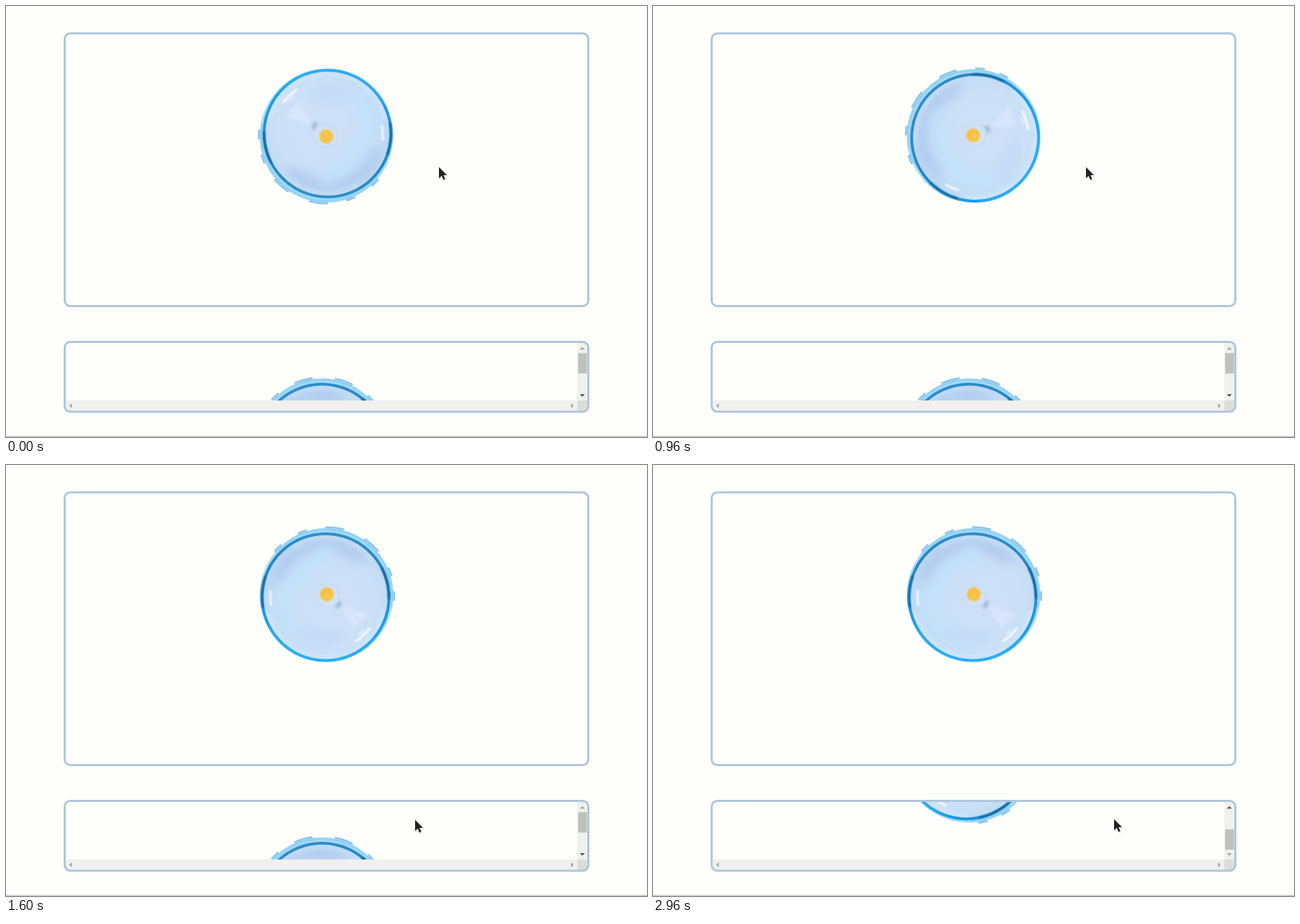
Animation of 912x614 px, one loop 3040 ms. Source, as an HTML page:

```html
<!DOCTYPE html>
<html lang="en">
<head>
<meta charset="utf-8">
<title>Scroll wheel</title>
<style>
  html, body { margin: 0; width: 100%; height: 100%; overflow: hidden; background: #fefffb; }
  svg { display: block; width: 912px; height: 614px; }
</style>
</head>
<body>
<svg viewBox="0 0 912 614" xmlns="http://www.w3.org/2000/svg">
  <defs>
    <filter id="soft" x="-50%" y="-50%" width="200%" height="200%"><feGaussianBlur stdDeviation="8"/></filter>
    <filter id="mild" x="-50%" y="-50%" width="200%" height="200%"><feGaussianBlur stdDeviation="2"/></filter>
    <filter id="fine" x="-50%" y="-50%" width="200%" height="200%"><feGaussianBlur stdDeviation=".8"/></filter>
    <linearGradient id="rim" gradientUnits="userSpaceOnUse" x1="-83" y1="-39" x2="83" y2="39">
      <stop offset="0" stop-color="#23a8f2"/>
      <stop offset=".35" stop-color="#1c98e2"/>
      <stop offset=".7" stop-color="#2485c2"/>
      <stop offset="1" stop-color="#2f8fca"/>
    </linearGradient>
    <radialGradient id="bowl" gradientUnits="userSpaceOnUse" cx="-12" cy="0" r="96">
      <stop offset="0" stop-color="#cfe0f8"/>
      <stop offset=".7" stop-color="#cbdff7"/>
      <stop offset="1" stop-color="#bcd9f4"/>
    </radialGradient>
    <clipPath id="disc"><circle cx="-2.5" cy="-2.5" r="90"/></clipPath>
    <clipPath id="view"><rect x="84" y="480" width="729" height="82"/></clipPath>
    <clipPath id="inner"><rect x="84" y="479" width="744" height="98" rx="7"/></clipPath>
    <g id="wheel"></g>
  </defs>

  <rect width="912" height="614" fill="#fefffb"/>
  <rect y="612.6" width="912" height="1.4" fill="#c6c8c5"/>
  <use id="top" href="#wheel"/>
  <g clip-path="url(#view)"><use id="low" href="#wheel"/></g>

  <g clip-path="url(#inner)">
    <path d="M813 479h15v83h-15zM84 562h729v15H84z" fill="#f0f1ee"/>
    <path d="M813 562h15v15h-15z" fill="#dcdddb"/>
    <rect id="thumb" x="814" y="494.5" width="12.5" height="29" fill="#c0c0be"/>
    <path id="up" d="M816.5 489.5h7l-3.500-3.500z"/>
    <path id="down" d="M816.500 553h7l-3.500 3.500z"/>
    <path d="M93.500 566v7l-3.500-3.500zM804 566v7l3.500-3.500z" fill="#a0a19f"/>
  </g>
  <g fill="none" stroke="#b0c6dc" stroke-width="3">
    <rect x="83.500" y="39" width="745" height="388.500" rx="8"/>
    <rect x="83.500" y="478.500" width="745" height="99.500" rx="8"/>
  </g>

  <g id="cursor">
    <path d="M1 1.500v16l3.800-3.300 2.600 5.800 2.800-1.200-2.500-5.600h5z" fill="#777" opacity=".4" filter="url(#fine)"/>
    <path d="M0 0v16l3.800-3.400 2.500 5.600 2.600-1.100-2.500-5.500h5z" fill="#222" stroke="#fff" stroke-width="1.600" paint-order="stroke" stroke-linejoin="round"/>
  </g>
</svg>
<script>
const $ = id => document.getElementById(id);
const polar = (deg, r, cx = 0, cy = 0) => {
  const a = deg * Math.PI / 180;
  return (cx + r * Math.cos(a)).toFixed(2) + ' ' + (cy + r * Math.sin(a)).toFixed(2);
};

// An open arc between two angles, clockwise.
function arc(from, to, r, color, width, extra = '', c = 0) {
  const big = to - from > 180 ? 1 : 0;
  return `<path d="M${polar(from, r, c, c)}A${r} ${r} 0 ${big} 1 ${polar(to, r, c, c)}"
    fill="none" stroke="${color}" stroke-width="${width}" ${extra}/>`;
}
const tab = (mid, half) =>
  arc(mid - half, mid + half, 95, '#9ad3f4', 4.5) +
  arc(mid - half, mid + half, 97, '#79b3da', 1);

const soft = 'filter="url(#soft)" stroke-linecap="round"';
const mild = 'filter="url(#mild)" stroke-linecap="round"';
const fine = 'filter="url(#fine)" stroke-linecap="round"';

// Angle 0 points at the first tab; the rim sits slightly off the axis.
$('wheel').innerHTML = `
  <circle r="95" fill="#a5dbf8"/>
  ${tab(0, 4)}${tab(28, 8)}${tab(63, 8)}${tab(91, 4)}${tab(335, 4)}${tab(112, 4)}
  ${arc(-30, 122, 93, '#86c8f0', 1.5, fine)}
  <circle cx="-2.500" cy="-2.500" r="90" fill="url(#bowl)"/>
  <g clip-path="url(#disc)">
    ${arc(-48, 62, 72, '#b2cbee', 20, soft)}
    <path d="M${polar(21, 58)}Q${polar(-14, 54)} ${polar(-52, 52)}T${polar(-116, 70)}"
      fill="none" stroke="#bfe2fa" stroke-width="24" opacity=".85" ${soft}/>
    ${arc(190, 228, 62, '#c3dbf7', 22, soft)}
    <path d="M${polar(150, 26)}L${polar(135, 66)} ${polar(162, 62)}Z" fill="#dce8fb" ${mild} opacity=".8"/>
    ${arc(-10, 110, 85, '#c4dcf3', 5, mild, -2.5)}
    ${arc(125, 275, 85, '#cfe7fb', 5, mild, -2.5)}
  </g>
  ${arc(149, 168, 78, '#fff', 2.8, fine)}
  ${arc(155, 162, 73, '#eaf4fe', 2, fine)}
  ${arc(281, 295, 80, '#f4faff', 2.8, fine)}
  <circle cx="-2.500" cy="-2.500" r="90.300" fill="none" stroke="url(#rim)" stroke-width="4"/>
  ${arc(84, 112, 90.3, '#15699f', 3, fine, -2.5)}
  ${arc(282, 310, 90.3, '#15699f', 3, fine, -2.5)}
  ${arc(150, 262, 91, '#3db9fa', 1.2, fine, -2.5)}
  <ellipse cx="-17" cy="10" rx="6.500" ry="5.500" fill="#a4b8d8" ${mild}/>
  <circle cx="-1" cy="1" r="18.500" fill="#c9def5" ${fine}/>
  <circle cx="-1" cy="1" r="14" fill="#d1e3f7" ${fine}/>
  <circle cx=".7" cy=".7" r="10" fill="#f3c244" ${fine}/>
  <circle cx="-2" cy="-1" r="5" fill="#f7c94f" ${mild}/>`;

const LOOP = 3040, STEP = 80, MAX_SCROLL = 211;

// Rows: time, then values.
const spinTop = [[0, 69], [280, 245], [560, 390], [880, 525], [1200, 603], [1360, 608], [1520, 609]];
const spinLow = [[1680, -134], [1760, -112], [2000, 57], [2200, 190], [2400, 292], [2640, 321], [2960, 326]];
const scroll = [[1680, 0], [1760, 25], [1840, 95], [1920, 175], [2000, MAX_SCROLL]];
const pointer = [[1040, 616, 229.5], [1200, 616, 233.5], [1280, 613, 265], [1440, 594, 430],
  [1560, 582, 505.500], [1680, 582, 505.500], [1840, 586, 507.500], [2080, 586, 507.500],
  [2240, 622, 505], [2400, 650.500, 503.500], [2560, 656, 504.500]];

function at(rows, t) {
  if (t <= rows[0][0]) return rows[0].slice(1);
  const i = rows.findIndex(row => row[0] > t);
  if (i < 0) return rows[rows.length - 1].slice(1);
  const a = rows[i - 1], b = rows[i], k = (t - a[0]) / (b[0] - a[0]);
  return a.slice(1).map((v, n) => v + (b[n + 1] - v) * k);
}

function place(id, x, y, deg = 0) {
  $(id).setAttribute('transform', `translate(${x} ${y}) rotate(${deg})`);
}

function draw(ms) {
  const t = Math.floor((ms % LOOP) / STEP) * STEP;
  const [y] = at(scroll, t);
  place('top', 456, 185, at(spinTop, t)[0]);
  place('low', 449.5, 625.5 - y, at(spinLow, t)[0]);
  place('cursor', ...at(pointer, t));
  $('thumb').setAttribute('y', 494.5 + 24.5 * y / MAX_SCROLL);
  $('up').setAttribute('fill', y > 0 ? '#4c4c4c' : '#a0a19f');
  $('down').setAttribute('fill', y < MAX_SCROLL ? '#4c4c4c' : '#a0a19f');
}

const start = performance.now();
function tick() {
  draw(performance.now() - start);
  requestAnimationFrame(tick);
}
tick();
</script>
</body>
</html>
```
